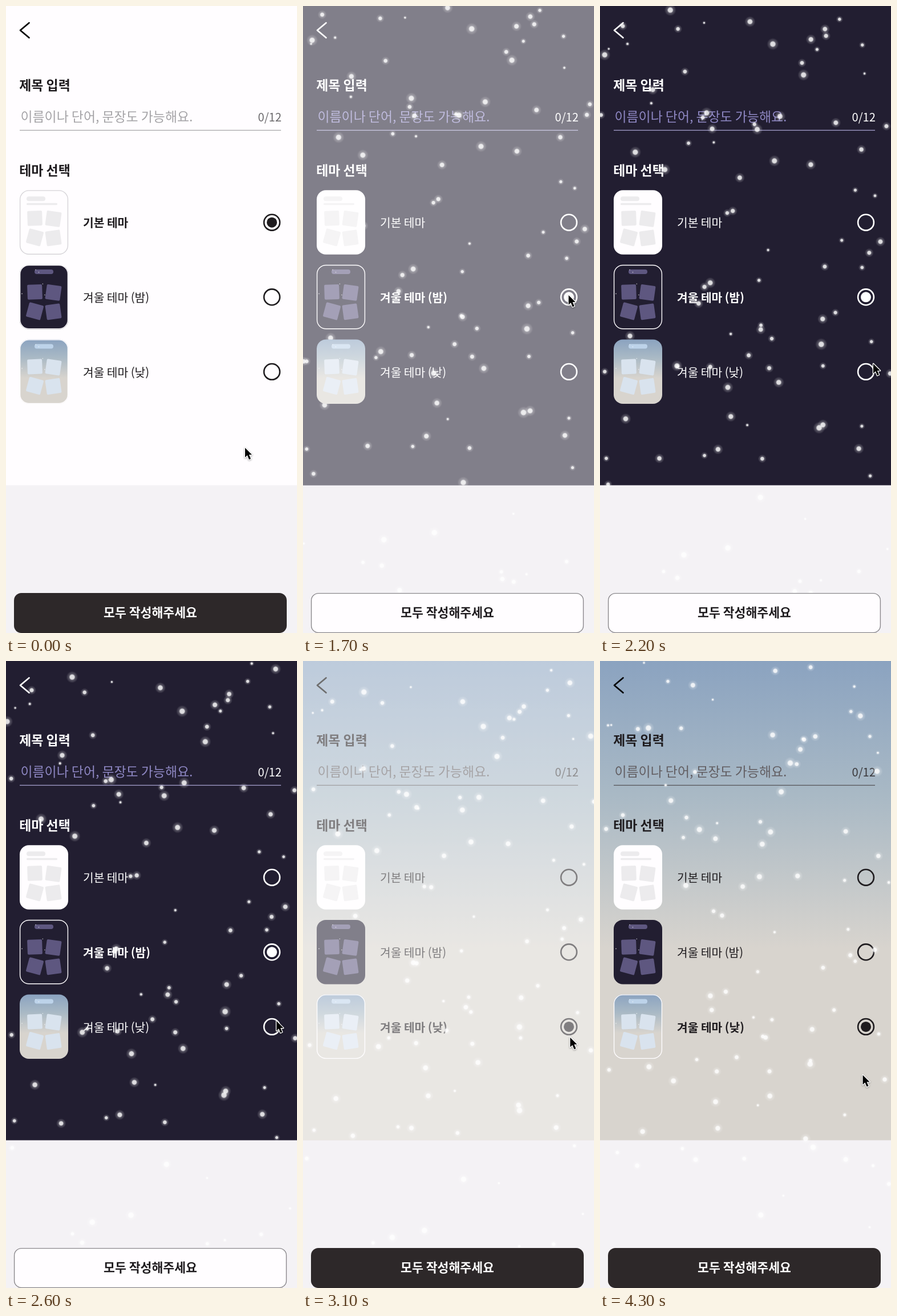
These frames come from a looping animation (510 by 1097 pixels, 4400 ms). An HTML page with a canvas:

```html
<!DOCTYPE html>
<html lang="ko">
<head>
<meta charset="utf-8">
<style>
html, body { margin: 0; width: 100%; height: 100%; overflow: hidden; }
canvas { display: block; width: 510px; height: 1097px; }
</style>
</head>
<body>
<canvas id="stage" width="510" height="1097"></canvas>
<script>
const c = document.getElementById('stage').getContext('2d');
const W = 510, H = 1097, FOLD = 838.5;
const LOOP = 4400, STEP = 100, NIGHT_AT = 1700, DAY_AT = 3100;
const FONT = '"Noto Sans CJK KR", "Noto Sans KR", "Noto Sans CJK", sans-serif';

const themes = [
  { ink: '#1f1c1f', hint: '#a5a4a7', line: '#a9a8aa', count: '#6c6a6d', dark: true },
  { ink: '#ffffff', hint: '#8e87c3', line: '#a29dcb', count: '#ffffff', dark: false },
  { ink: '#1f1c1f', hint: '#625e62', line: '#57565a', count: '#3a383b', dark: true }
];
const cards = [
  { label: '기본 테마', tile: '#ecebed', pill: '#ecebed' },
  { label: '겨울 테마 (밤)', tile: '#5e5780', pill: '#5e5780' },
  { label: '겨울 테마 (낮)', tile: '#d9e3ee', pill: '#bdd3ea' }
];
const tilts = [-2, 8, 15, -8];

// key points of the pointer tip
const path = [
  { t: 0, x: 419, y: 773 },
  { t: 400, x: 494, y: 556 },
  { t: 700, x: 471, y: 516 },
  { t: 1000, x: 465.5, y: 506 },
  { t: 1800, x: 465.5, y: 506 },
  { t: 2200, x: 479, y: 626 },
  { t: 2900, x: 473, y: 631 },
  { t: 3500, x: 464.5, y: 681 },
  { t: LOOP, x: 460.5, y: 725 }
];

let seed = 11;
const rand = (a, b) => a + (b - a) * (seed = seed * 16807 % 2147483647) / 2147483647;
const many = (n, make) => Array.from({ length: n }, make);
const mod = (a, n) => (a % n + n) % n;

const stars = many(10, () => ({ x: rand(4, 81), y: rand(4, 108) }));
// speeds in px/s; near flakes are larger and fall faster
const flakes = many(105, () => {
  const r = rand(1.6, 4.9);
  return { r, x: rand(0, W), y: rand(0, H), vx: rand(-19, 19), vy: r * 11 };
});

function text(s, x, y, size, color, weight = 400, align = 'left') {
  c.font = `${weight} ${size}px ${FONT}`;
  c.textAlign = align;
  c.fillStyle = color;
  c.fillText(s, x, y);
}

function box(x, y, w, h, r, fill, stroke) {
  c.beginPath();
  c.roundRect(x, y, w, h, r);
  if (fill) { c.fillStyle = fill; c.fill(); }
  if (stroke) { c.strokeStyle = stroke; c.lineWidth = 1.4; c.stroke(); }
}

function disc(x, y, r, fill) {
  c.beginPath();
  c.arc(x, y, r, 0, 7);
  c.fillStyle = fill;
  c.fill();
}

function backdrop(kind, y, h) {
  if (kind === 0) return '#fffdff';
  if (kind === 1) return '#221e31';
  const g = c.createLinearGradient(0, y, 0, y + h);
  g.addColorStop(0, '#8ba3c0');
  g.addColorStop(0.28, '#a9b9c5');
  g.addColorStop(0.6, '#d8d4ce');
  return g;
}

function card(i, y, mode) {
  const { tile, pill } = cards[i];
  box(24, y, 85, 112.5, 16, backdrop(i, y, 112.5));
  if (mode === 0 || i === mode)
    box(24.6, y + 0.6, 83.8, 111.3, 15.5, null, mode === i && !i ? '#d6d4d8' : '#fffdff');
  c.save();
  c.translate(24, y);
  if (i === 0) {
    box(12, 11, 33, 8, 4, pill);
    box(12, 22.5, 54, 3.5, 1.7, pill);
    c.translate(0, 1.5);
  } else {
    box(26, 8, 33, 8, 4, pill);
    for (const s of stars) disc(s.x, s.y, 0.8, 'rgba(255,255,255,.75)');
  }
  tilts.forEach((tilt, n) => {
    const col = n % 2, row = n >> 1;
    c.save();
    c.translate(26.5 + 32.5 * col, 47.5 + 33.5 * row + col);
    c.rotate(tilt * Math.PI / 180);
    box(-13, -13, 26, 26, 2, tile);
    c.restore();
  });
  c.restore();
}

function radio(y, on, ink) {
  c.beginPath();
  c.arc(466, y, 13.9, 0, 7);
  c.strokeStyle = ink;
  c.lineWidth = 2.6;
  c.stroke();
  if (on) disc(466, y, 9, ink);
}

function snow(t) {
  for (const f of flakes) {
    const x = mod(f.x + f.vx * t / 1000, W), y = mod(f.y + f.vy * t / 1000, H);
    const R = f.r * 2.2, g = c.createRadialGradient(x, y, 0, x, y, R);
    g.addColorStop(0, 'rgba(255,255,255,.87)');
    g.addColorStop(0.36, 'rgba(255,255,255,.83)');
    g.addColorStop(0.52, 'rgba(255,255,255,.25)');
    g.addColorStop(1, 'rgba(255,255,255,0)');
    disc(x, y, R, g);
  }
}

function pointer(t) {
  const n = path.findIndex(p => p.t > t), a = path[n - 1], b = path[n];
  const u = (t - a.t) / (b.t - a.t), k = u * (2 - u);
  const arrow = new Path2D('M0 0V16.8L3.9 13.1L7 20.4L10 19.1L6.9 12H12Z');
  c.save();
  c.translate(a.x + (b.x - a.x) * k, a.y + (b.y - a.y) * k);
  c.shadowColor = 'rgba(0,0,0,.35)';
  c.shadowBlur = 3;
  c.shadowOffsetY = 1;
  c.strokeStyle = '#fff';
  c.lineWidth = 2.6;
  c.lineJoin = 'round';
  c.stroke(arrow);
  c.shadowColor = 'transparent';
  c.fillStyle = '#000';
  c.fill(arrow);
  c.restore();
}

function draw(t) {
  const mode = t < NIGHT_AT ? 0 : t < DAY_AT ? 1 : 2;
  const th = themes[mode];
  const top = i => 322.3 + 130.6 * i;
  c.fillStyle = '#f4f2f5';
  c.fillRect(0, 0, W, H);
  c.fillStyle = backdrop(mode, 0, FOLD);
  c.fillRect(0, 0, W, FOLD);

  c.strokeStyle = mode === 1 ? '#fff' : '#000';
  c.lineWidth = 2.7;
  c.lineCap = c.lineJoin = 'round';
  c.stroke(new Path2D('M40.5 29.5L25 42.5L40.5 55.5'));

  text('제목 입력', 23.3, 146.5, 22.9, th.ink, 700);
  text('이름이나 단어, 문장도 가능해요.', 25.5, 201.8, 22.9, th.hint);
  text('0/12', 483, 202, 20.2, th.count, 400, 'right');
  c.fillStyle = th.line;
  c.fillRect(24, 216.8, 458, 1.3);
  text('테마 선택', 23.3, 296, 22.9, th.ink, 700);
  cards.forEach((d, i) => {
    text(d.label, 135, top(i) + 65, 20.3, th.ink, i === mode ? 700 : 400);
    radio(top(i) + 56.4, i === mode, th.ink);
  });

  if (mode) snow(t);
  cards.forEach((d, i) => card(i, top(i), mode));

  // the page fades in from white after each choice
  if (mode) {
    const age = t - (mode === 1 ? NIGHT_AT : DAY_AT);
    c.fillStyle = `rgba(255,255,255,${(0.43 * 0.2 ** (age / STEP)).toFixed(3)})`;
    c.fillRect(0, 0, W, FOLD);
  }

  if (th.dark) box(14, 1027, 478, 70, 13, '#2d2829');
  else box(14.6, 1027.6, 476.8, 68.8, 12.5, '#fffdff', '#8b898d');
  text('모두 작성해주세요', 253, 1069.3, 21.6, th.dark ? '#fff' : '#1f1c1f', 700, 'center');
  pointer(t);
}

function tick() {
  draw(Math.floor(performance.now() % LOOP / STEP) * STEP);
  requestAnimationFrame(tick);
}
tick();
</script>
</body>
</html>
```
